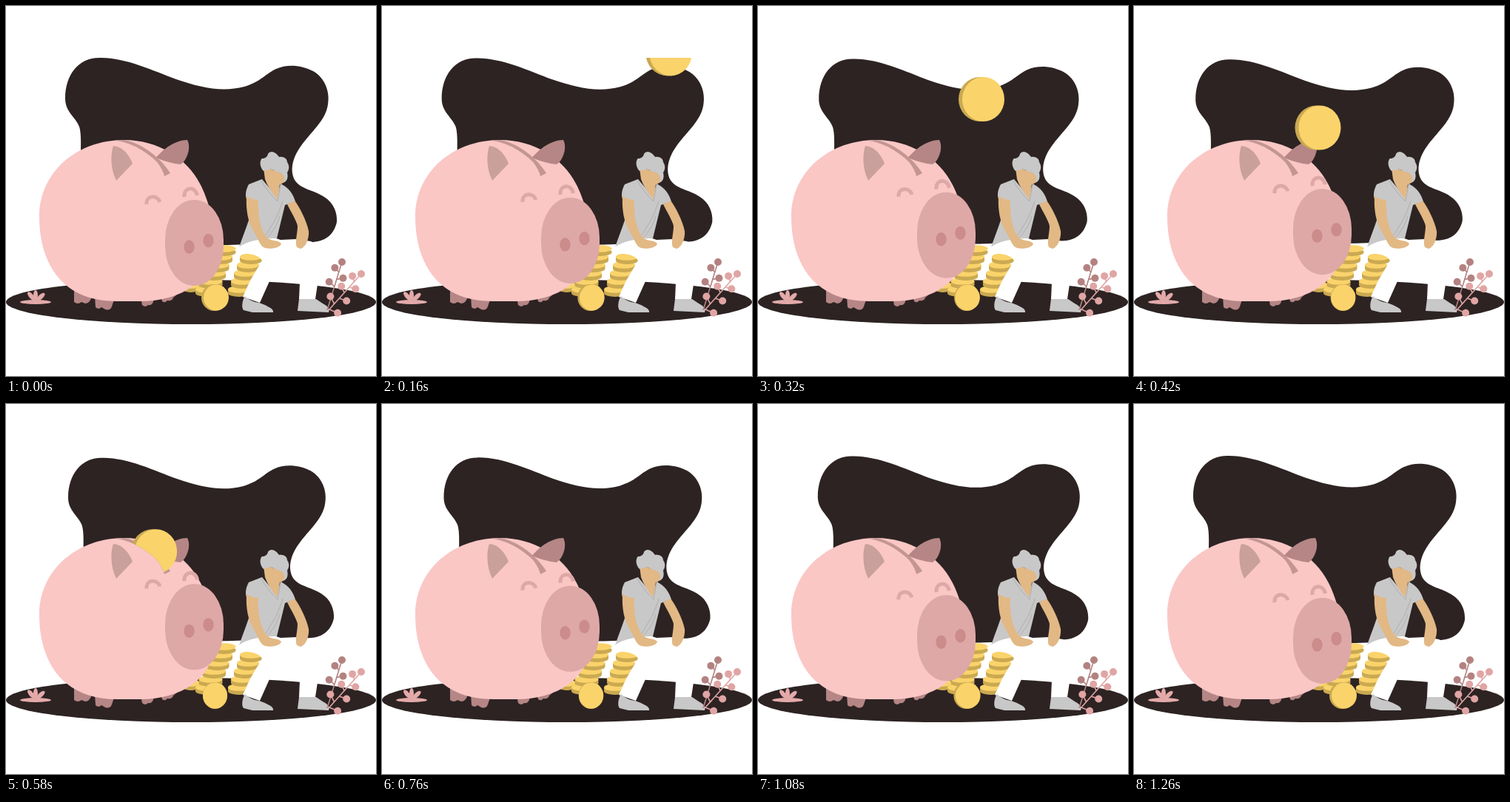
An HTML page for the animation above (1280 ms loop, 500 by 500 pixels).

```html
<!DOCTYPE html>
<html lang="en">
<head>
<meta charset="utf-8">
<title>Piggy bank</title>
<style>
  html, body { margin: 0; width: 100%; height: 100%; overflow: hidden; background: #fff; }
  svg { display: block; width: 100vw; height: 100vh; }
</style>
</head>
<body>
<svg viewBox="0 0 500 500">
  <defs>
    <clipPath id="slotClip">
      <path d="M0 70H500V227L222 226 214 230C213 225 210 219 205 212C196 202 175 186 150 182H0Z"/>
    </clipPath>
  </defs>

  <path id="blob" fill="#2d2323" d="M80 125C80 93 98 70 126 70C160 69 198 87 230 99C262 110 292 117 322 109C345 102 350 92 365 85C380 78 400 80 415 88C431 97 438 116 435 133C432 155 412 170 398 190C388 204 383 221 390 235C398 248 415 248 430 258C443 266 448 280 447 292C443 310 430 319 412 319L300 323H150L101 200C101 190 102 172 99 163C94 150 80 143 80 125Z"/>
  <ellipse cx="250" cy="400" rx="250" ry="30" fill="#2d2323"/>

  <g fill="#e3aaa9">
    <ellipse cx="40" cy="400" rx="21" ry="3"/>
    <ellipse cx="40" cy="391" rx="3" ry="7"/>
    <ellipse cx="34" cy="392" rx="3" ry="7" transform="rotate(-40 34 392)"/>
    <ellipse cx="47" cy="393" rx="3" ry="7" transform="rotate(48 47 393)"/>
  </g>

  <g id="stacks"></g>
  <g id="floorCoin">
    <ellipse cy="394" ry="18" fill="#caa951"/>
    <ellipse cy="394" ry="17.5" fill="#fad36b"/>
  </g>

  <g fill="#b58685">
    <path d="M92 384V400Q97 404 102 400L107 402Q113 402 116 393Z"/>
    <path d="M120 392L121 407Q125 411 129 407L134 410Q141 412 143 406L147 394Z"/>
    <path d="M182 394L184 404Q188 408 192 404Q198 406 200 396Z"/>
    <path d="M209 391L211 399Q215 402 218 398Q225 399 226 394L231 390 226 380Z"/>
  </g>
  <path fill="#fac7c5" d="M45 285C45 225 95 181 160 181C205 181 245 206 262 240C272 258 284 296 282 330C276 369 241 399 180 399H150C70 399 45 340 45 285Z"/>
  <path fill="#c39694" d="M150 182C175 186 196 202 205 212C210 219 213 225 214 230L222 226C214 212 190 187 160 181Z"/>
  <path fill="#c9a09c" d="M145 189C141 200 141 220 149 236L171 213C166 200 157 190 145 189Z"/>
  <path fill="#b58685" d="M203 205C213 192 230 181 245 181C250 190 246 207 236 214C226 213 214 210 203 205Z"/>

  <g clip-path="url(#slotClip)">
    <g id="coin">
      <ellipse cx="-2" rx="29" ry="30" fill="#caa951"/>
      <ellipse cx="2.500" rx="28.500" ry="30" fill="#fad36b"/>
    </g>
  </g>

  <g id="face">
    <g fill="none" stroke="#dea8a7" stroke-width="5">
      <path d="M190 268C189 255 205 255 208 265"/>
      <path d="M241 258C240 244 256 243 258.500 256"/>
    </g>
    <rect x="215" y="262" width="79" height="116" rx="39" ry="54" fill="#dea8a7"/>
    <ellipse cx="247.500" cy="325.500" rx="7.200" ry="9.200" fill="#cb8c8b"/>
    <ellipse cx="273.500" cy="317" rx="7.200" ry="9.200" fill="#cb8c8b"/>
  </g>

  <path fill="#fff" d="M308 330L317 325C326 316 345 312 362 313L371 316 393 315 412 318C425 325 430 335 425 350L418 396H396L397 374 356 372 343 401 320 393 330 371 346 344C341 335 328 335 318 334Z"/>
  <g fill="#c8c8c8">
    <path d="M323 392C319 398 318 408 321 411L333 414H361C362 409 355 407 350 404L342 401C334 400 328 397 323 392Z"/>
    <path d="M396 396L394 412 436 414C438 409 434 405 428 402L419 396Z"/>
    <path d="M346 234L328 241C324 248 323 256 325 261L333 268C332 282 324 300 315 326C324 318 345 314 366 314L377 269 391 264C387 252 382 246 371 240L366 258Z"/>
  </g>
  <path fill="none" stroke="#a9a9a9" stroke-width=".8" d="M374 263C368 285 357 300 350 311M370 284C366 297 360 305 354 312M345 236C350 245 358 256 367 264L371 242"/>
  <g fill="#e2b885">
    <path d="M348 219L350 234C354 245 361 254 367 261L370 241C376 240 378 235 376 227L354 219Z"/>
    <path d="M325 257C324 275 327 293 335 305C341 314 343 325 350 327C358 329 371 327 372 321C368 316 356 318 352 312C344 302 340 285 341 262Q333 262 325 257Z"/>
    <path d="M380 268C385 278 392 289 394 297C394 308 390 318 393 326L398 328C406 326 410 312 409 304C406 290 397 272 390 263Z"/>
  </g>
  <path fill="#c8c8c8" d="M348 223C342 217 343 208 346 206C350 206 353 204 354 200C358 194 365 198 369 204C375 203 380 206 380 211C384 217 382 222 380 225C382 233 379 238 374 239C378 233 376 228 370 225C364 225 361 219 355 221Z"/>

  <g id="plant"></g>
</svg>
<script>
const LOOP = 1280, STEP = 20, PEAK = 600;
const $ = id => document.getElementById(id);
const ease = p => (1 - Math.cos(Math.PI * p)) / 2;

function add(parent, tag, attrs) {
  const node = document.createElementNS("http://www.w3.org/2000/svg", tag);
  for (const key in attrs) node.setAttribute(key, attrs[key]);
  parent.appendChild(node);
}

// Leaning pile of coins, built from the bottom up
function stack(x, y, count, lean, r) {
  for (let i = 0; i < count; i++, x += lean, y -= 11) {
    add($("stacks"), "path", { fill: "#caa951", d: `M${x - r} ${y}v5a${r} 5 0 0 0 ${2 * r} 0v-5z` });
    add($("stacks"), "ellipse", { cx: x, cy: y, rx: r, ry: 4.8, fill: "#fad36b" });
  }
}
stack(250, 377, 1, 0, 12);
stack(272, 383, 6, 4.5, 16);
stack(315, 383, 5, 4, 15);

// Stem with a leaf at its tip and others on alternating sides
function sprig(x0, y0, x1, y1, color, count, from, side) {
  const dx = x1 - x0, dy = y1 - y0, len = Math.hypot(dx, dy);
  const leaf = (x, y, sx, sy) => {
    add($("plant"), "path", { d: `M${sx} ${sy}L${x} ${y}`, stroke: color, "stroke-width": 1.6 });
    add($("plant"), "circle", { cx: x, cy: y, r: 5, fill: color });
  };
  leaf(x1, y1, x0, y0);
  for (let i = 0; i < count; i++, side = -side) {
    const f = from + (1 - from) * i / count;
    const off = side * (12 - 6 * f) / len;
    const x = x0 + dx * f, y = y0 + dy * f;
    leaf(x - dy * off, y + dx * off, x - dx * 0.06, y - dy * 0.06);
  }
}
sprig(434, 411, 454, 346, "#b38281", 3, 0.55, -1);
sprig(436, 411, 480, 362, "#e0a5a4", 6, 0.08, 1);

// Steady fall, braking at the slot, a short rest, then sinking inside
function coinAt(t) {
  const brake = 420, stop = 604;
  const d = Math.max(0, Math.min(t, stop) - brake);
  const run = Math.min(t, brake) + d - d * d / (2 * (stop - brake)) - 320;
  const sink = ease(Math.min(1, Math.max(0, (t - 630) / 200)));
  return [302 - 0.535 * run - 38 * sink, 126 + 0.385 * run + 36 * sink];
}

function draw(t) {
  const q = ease(t < PEAK ? t / PEAK : (LOOP - t) / (LOOP - PEAK));
  $("blob").setAttribute("transform", `translate(263 195) scale(${1 - 0.022 * q}) translate(-263 -195)`);
  $("face").setAttribute("transform", `translate(0 ${-18.7 * q})`);

  const [edge, front] = $("floorCoin").children;
  edge.setAttribute("cx", 281.5 + q);
  edge.setAttribute("rx", 17.5 - q);
  front.setAttribute("cx", 284 - 1.5 * q);
  front.setAttribute("rx", 17 - 0.5 * q);

  const [x, y] = coinAt(t);
  $("coin").setAttribute("transform", `translate(${x} ${y})`);
  $("coin").setAttribute("visibility", t < 830 ? "visible" : "hidden");
}

const start = performance.now();
function tick() {
  const t = (performance.now() - start) % LOOP;
  draw(Math.floor(t / STEP) * STEP);
  requestAnimationFrame(tick);
}
draw(0);
requestAnimationFrame(tick);
</script>
</body>
</html>
```
